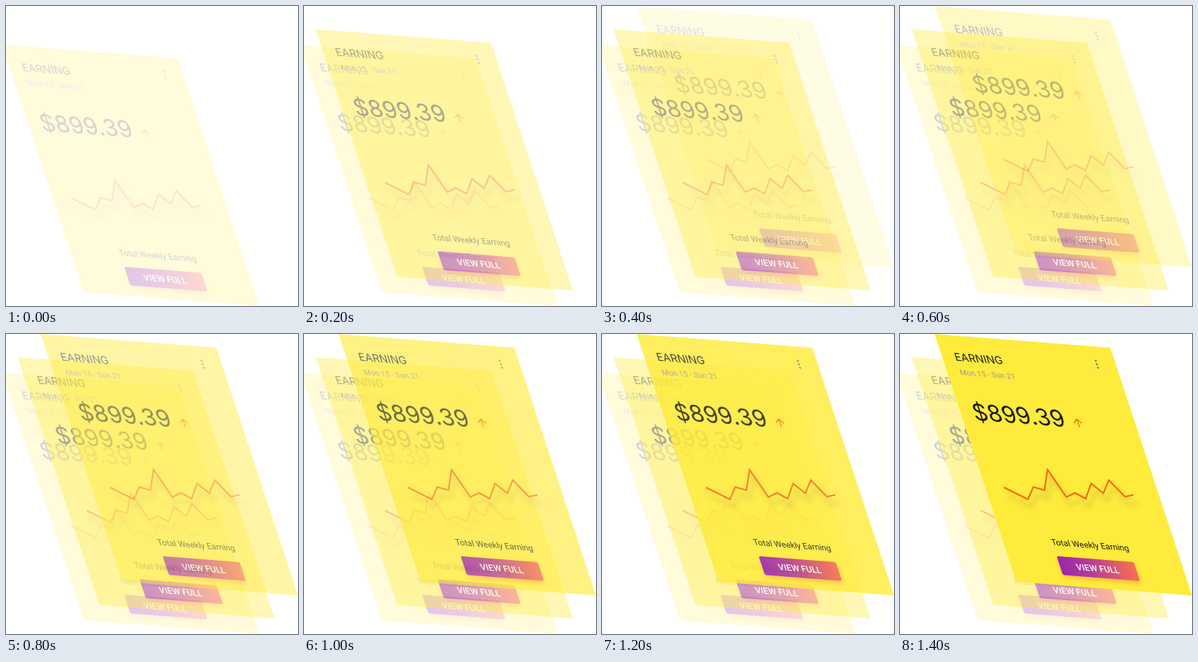
Animation of 379 by 389 pixels, one loop 6400 ms. Source, as an HTML page:

```html
<!DOCTYPE html>
<html lang="en">
<head>
<meta charset="utf-8">
<title>Earning card</title>
<style>
  html, body { margin: 0; width: 100%; height: 100%; overflow: hidden; background: #fff; }
  svg { display: block; }
  text { font-family: Roboto, Arial, sans-serif; fill: #1d1b14; }
  .wide { font-family: Inter, Arial, sans-serif; }
  .line { fill: none; stroke: #ff6412; }
</style>
</head>
<body>
<svg width="379" height="389" viewBox="0 0 379 389">
  <defs>
    <linearGradient id="fill">
      <stop offset="0" stop-color="#9c27a8"/>
      <stop offset=".35" stop-color="#ae3a9a"/>
      <stop offset="1" stop-color="#f87050"/>
    </linearGradient>
    <filter id="blur" x="-20%" y="-50%" width="140%" height="200%">
      <feGaussianBlur stdDeviation="3"/>
    </filter>

    <g id="button" transform="matrix(1 .078 .33 1 45 0)">
      <rect x="66" y="286" width="98" height="24" rx="2" fill="#f0704a" opacity=".35" filter="url(#blur)"/>
      <rect x="65" y="283" width="100" height="24.3" rx="2" fill="url(#fill)"/>
      <text x="114.3" y="299.3" font-size="11.4" font-weight="500" text-anchor="middle" style="fill:#fff">VIEW FULL</text>
    </g>

    <polyline id="chart" points="135,199 166,214.5 173,198.5 187.5,202.5 191.5,176 216,211.5 227,206 241,213.5 248,194 264,206.5 271,189.5 292,211 303,208.5"/>

    <g id="card">
      <g transform="matrix(1 .078 .33 1 45 0)">
        <rect width="228" height="321.3" fill="#ffeb3b"/>
        <text class="wide" x="16.5" y="33.3" font-size="14">EARNING</text>
        <text x="16.7" y="51.6" font-size="10" style="fill:#9c96a0">Mon 15 - Sun 21</text>
        <text class="wide" x="16.3" y="110.2" font-size="30">$899.39</text>
        <text x="64" y="268.6" font-size="10.9">Total Weekly Earning</text>
        <path class="line" stroke-width="1.3" d="M152 109v-10.5m-5 5l5-5l5 5"/>
        <g fill="#77747c">
          <circle cx="202.8" cy="18.9" r="1.3"/>
          <circle cx="202.8" cy="23.4" r="1.3"/>
          <circle cx="202.8" cy="27.9" r="1.3"/>
        </g>
      </g>
      <use href="#chart" x="5" y="10" fill="none" stroke="#a08c30" stroke-width="3" opacity=".35" filter="url(#blur)"/>
      <use href="#chart" class="line" stroke-width="2"/>
    </g>

    <g id="face"><use href="#card"/><use href="#button"/></g>
  </defs>

  <!-- A second, weaker button keeps it denser than its faded card. -->
  <g class="layer" transform="translate(-50 50)"><use href="#face"/><use href="#button"/></g>
  <g class="layer" transform="translate(-30 30)"><use href="#face"/><use href="#button"/></g>
  <g class="layer"><use href="#face"/><use href="#button"/></g>
</svg>
<script>
  const LOOP = 6400, STEP = 200;
  const layers = [...document.querySelectorAll('.layer')];
  const start = performance.now();

  function opacities(step) {
    const rise = Math.min(Math.max(step - 1, 0), 6) / 6;
    return [0.18, step < 1 ? 0 : 0.37, rise ** 1.13];
  }

  function draw() {
    const time = (performance.now() - start) % LOOP;
    opacities(Math.floor(time / STEP)).forEach((value, i) => {
      const [face, button] = layers[i].children;
      face.setAttribute('opacity', value);
      button.setAttribute('opacity', value / 2);
    });
    requestAnimationFrame(draw);
  }
  draw();
</script>
</body>
</html>
```
